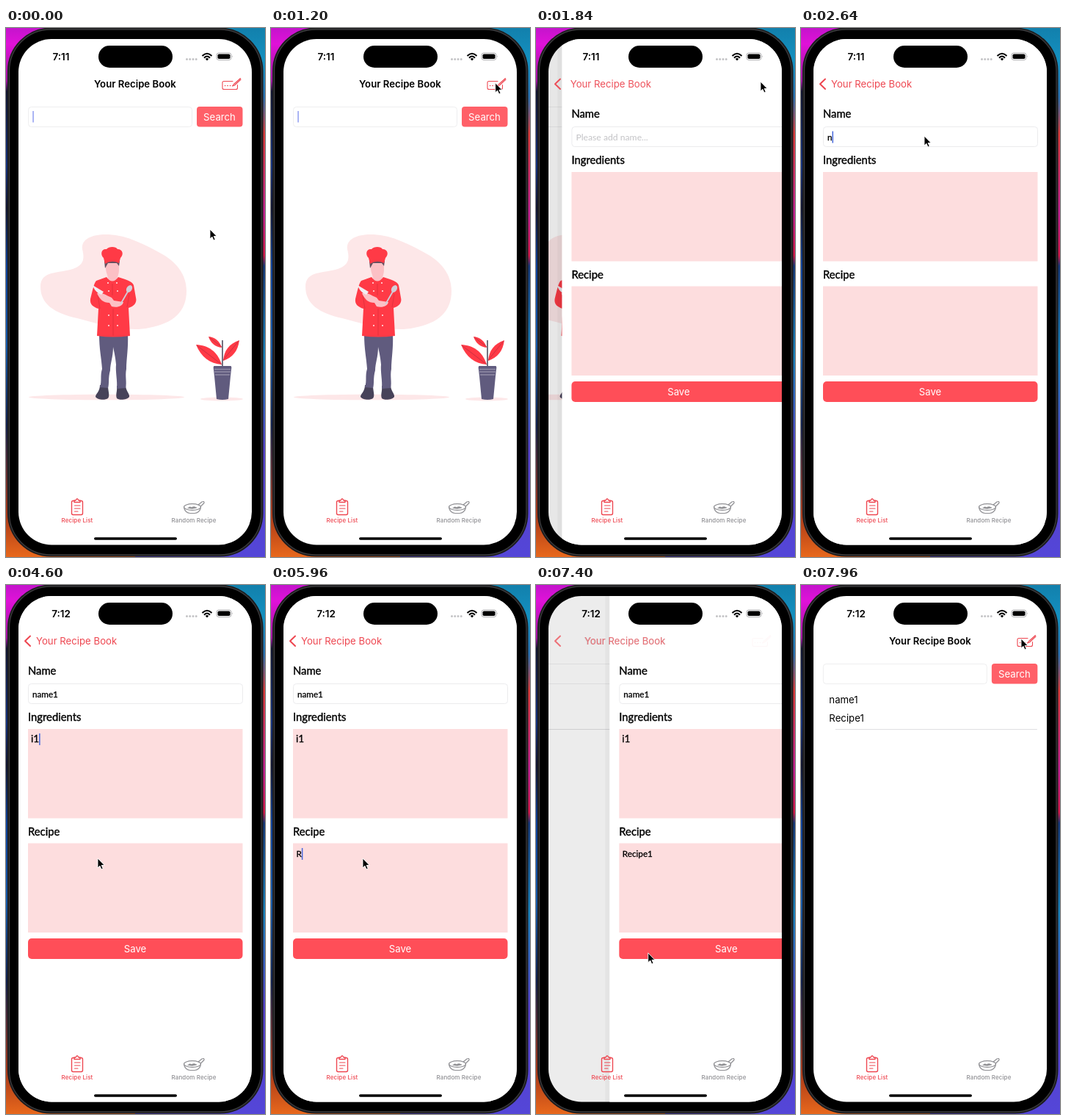
These frames come from a looping animation (353x720 px, 8 s). An HTML page:

```html
<!DOCTYPE html>
<html lang="en">
<head>
<meta charset="utf-8">
<title>Recipe book</title>
<style>
  html, body { margin: 0; width: 100%; height: 100%; overflow: hidden; background: #10142a; }
  svg { display: block; width: 100%; height: 100%; }
  text { font: 13.2px Inter, Roboto, sans-serif; white-space: pre; }
  .bold { font-weight: 600; }
  .tab { font-size: 8px; font-weight: 500; letter-spacing: .1px; }
  .label { font: 400 14.8px Lato, sans-serif; stroke: #000; stroke-width: .4; }
  .input { font: 400 11.700px Lato, sans-serif; stroke: #000; stroke-width: .3; }
  .hint { font: 12.2px Lato, sans-serif; fill: #c3c3c6; }
  .mid { text-anchor: middle; }
  .line { fill: none; stroke: currentColor; stroke-linecap: round; stroke-linejoin: round; }
  .red { color: #ee4751; }
  .grey { color: #8f8f93; }
</style>
</head>
<body>
<svg viewBox="0 0 353 720" preserveAspectRatio="none">
  <defs>
    <clipPath id="screen"><rect x="17" y="15" width="318" height="688.500" rx="45"/></clipPath>
    <linearGradient id="wallLeft" x2="0" y2="1">
      <stop offset="0" stop-color="#c414cc"/><stop offset=".03" stop-color="#e012d8"/>
      <stop offset=".1" stop-color="#a012a0"/><stop offset=".12" stop-color="#10142e"/>
      <stop offset=".26" stop-color="#12307c"/><stop offset=".34" stop-color="#10142e"/>
      <stop offset=".45" stop-color="#0c3f98"/><stop offset=".6" stop-color="#1458a8"/>
      <stop offset=".75" stop-color="#10204c"/><stop offset=".92" stop-color="#a83818"/>
      <stop offset="1" stop-color="#e8681c"/>
    </linearGradient>
    <linearGradient id="wallRight" x2="0" y2="1">
      <stop offset="0" stop-color="#1280ac"/><stop offset=".06" stop-color="#1490c0"/>
      <stop offset=".13" stop-color="#2870b0"/><stop offset=".2" stop-color="#d83a38"/>
      <stop offset=".35" stop-color="#c02090"/><stop offset=".43" stop-color="#d01848"/>
      <stop offset=".45" stop-color="#143878"/><stop offset=".62" stop-color="#1880b8"/>
      <stop offset=".8" stop-color="#5440c8"/><stop offset="1" stop-color="#5446d8"/>
    </linearGradient>
  </defs>

  <rect width="177" height="720" fill="url(#wallLeft)"/>
  <rect x="176" width="177" height="720" fill="url(#wallRight)"/>
  <rect x="3" y="0.5" width="346.500" height="718" rx="58" fill="#000" stroke="#1c1c1e" stroke-width="2"/>
  <rect x="4.500" y="2" width="343.500" height="715" rx="56.500" fill="none" stroke="#3c3c3e" stroke-width="1.300"/>

  <g clip-path="url(#screen)">
    <rect x="17" y="15" width="318" height="689" fill="#fff"/>

    <g id="home">
      <rect x="30.500" y="107.500" width="223" height="27" rx="4" fill="#fff" stroke="#eeeeef"/>
      <rect x="260" y="107" width="62.500" height="27.500" rx="4" fill="#ff6068"/>
      <text class="mid" x="291" y="125.500" fill="#fff">Search</text>
      <rect id="searchCaret" x="36.300" y="113" width="1.500" height="15.500" fill="#6275ec"/>

      <g id="emptyArt">
        <path fill="#fde7e8" d="M47 352C47 330 72 334 91 328C109 322 106 310 104 301C102 286 120 280 140 281C165 282 190 295 215 309C235 321 246 338 246 358C246 386 228 402 195 408C165 415 124 402 97 395C66 388 47 376 47 352Z"/>
        <ellipse cx="137" cy="502.500" rx="106" ry="3.800" fill="#fde7e8"/>
        <ellipse cx="294" cy="505" rx="29" ry="2.500" fill="#fde7e8"/>
        <!-- chef -->
        <g fill="#474259">
          <path d="M128 486L139 487C139 494 142 500 139 504C135 507 124 506 122 502C122 498 128 495 128 486Z"/>
          <path d="M151 487L163 486C163 494 169 498 168 502C166 506 154 507 151 504C149 499 152 494 151 487Z"/>
        </g>
        <path fill="#605b7e" d="M127 416H166C167 436 164 450 164 464C162 474 165 482 163 490L151 491C152 480 149 468 150 458C149 446 147 440 146 434C146 448 142 456 142 466C139 476 141 484 139 490L128 489C131 480 128 474 131 464C130 448 127 438 127 416Z"/>
        <path fill="#fcc0c5" d="M136 319H154V329C154 335 152 338 151 343L145 348L139 342C139 336 136 333 136 327Z"/>
        <path fill="#66505f" d="M134 317H155L154 324L151 320L139 320L135 327Z"/>
        <path fill="#ff3a46" d="M135 321L133 313C128 308 130 300 137 301C140 297 150 297 152 301C159 301 161 308 156 313L154 320Q144 315 135 321Z"/>
        <path fill="#ff3a46" d="M137 339L123 344C120 347 118 357 115 369C114 376 119 380 126 382L124 419Q146 422 169 419L167 381C174 379 179 374 177 367L174 350C172 345 166 343 153 339Q145 350 137 339Z"/>
        <path fill="none" stroke="#d92e3b" stroke-width=".7" d="M125 363L128 382M168 362L165 380M145 348V364M146 382V419"/>
        <path fill="#fcc0c5" d="M124 361C130 359 135 363 144 367L147 371L160 373C159 379 151 381 144 379L141 374C133 374 128 370 124 361Z"/>
        <path fill="#f1eef3" d="M118 350L133 359L130 363C124 361 120 356 118 350Z"/>
        <path fill="none" stroke="#d0ced8" stroke-width="1.800" d="M156 376L167 357"/>
        <ellipse cx="168" cy="355" rx="3.600" ry="5.300" fill="#d0ced8" transform="rotate(32 168 355)"/>
        <path fill="none" stroke="#fff" stroke-width="1.800" stroke-linecap="round" d="M139 347h0M151 347h0M140 358h0M152 358h0M140 391h0M152 391h0M140 405h0M152 405h0"/>
        <!-- plant -->
        <g fill="#ff3a46">
          <path d="M259 431C276 432 288 440 294 458C278 457 266 448 259 431Z"/>
          <path d="M318 425C316 440 309 448 296 453C297 439 304 430 318 425Z"/>
          <path d="M276 420C285 421 291 426 294 435C285 434 279 429 276 420Z"/>
        </g>
        <path fill="none" stroke="#b42c40" stroke-width=".7" d="M260 432L294 458M317 426L296 452M277 421L294 434"/>
        <path fill="none" stroke="#454356" stroke-width="1.500" d="M295 425V461"/>
        <path fill="#605b7e" d="M284 460H306Q308 460 307 465L306 474L303 505Q295 507 287 505L284 474L283 465Q282 460 284 460Z"/>
        <path fill="none" stroke="#918da7" stroke-width="1.400" d="M284 464.500H306M284 468H306M285 472H305"/>
      </g>

      <g id="savedList">
        <text x="38.500" y="161">name1</text>
        <text x="38.500" y="186">Recipe1</text>
        <path stroke="#dfdfe1" d="M47 196.500H322"/>
      </g>
    </g>
    <rect id="dim" x="17" y="15" width="318" height="689"/>

    <g id="form">
      <rect id="edge" x="11" y="15" width="6" height="689"/>
      <rect x="17" y="15" width="318" height="689" fill="#fff"/>
      <text class="label" x="30" y="122">Name</text>
      <text class="label" x="30" y="185">Ingredients</text>
      <text class="label" x="30" y="341">Recipe</text>
      <rect x="30.500" y="134.500" width="292" height="27" rx="4" fill="#fff" stroke="#ebebed"/>
      <rect x="30" y="196" width="292.500" height="121.500" fill="#fdddde"/>
      <rect x="30" y="351.500" width="292.500" height="121.500" fill="#fdddde"/>
      <text id="hint" class="hint" x="36" y="153">Please add name...</text>
      <text id="name" class="input" x="36" y="153"></text>
      <text id="ingredients" class="input" style="font-size:13.500px" x="34" y="214"></text>
      <text id="recipe" class="input" x="34.500" y="370"></text>
      <rect id="caret" width="1.500" height="16" fill="#4668dc"/>
      <g id="save">
        <rect x="30" y="481" width="292.500" height="28" rx="5" fill="#ff4e58"/>
        <text class="mid" x="176" y="500" fill="#fff">Save</text>
      </g>
    </g>

    <text id="title" class="bold" y="81">Your Recipe Book</text>
    <g class="red">
      <text id="back" y="81" fill="currentColor">Your Recipe Book</text>
      <path id="chevron" class="line" stroke-width="2" d="M33 69.500L26 76.200L33 83"/>
      <g id="compose" class="line" stroke-width="1.100">
        <path d="M309 72.500H297Q295 72.500 295 74.500V81.500Q295 83.500 297 83.500H313.500Q315.500 83.500 315.500 81.500V77.500"/>
        <path d="M319.500 68.500L310.500 76.500L308.500 79L311.500 78L320 70"/>
        <path d="M298.500 78.500h.2M302 78.500h.2M305.500 78.500h.2" stroke-width="1.600"/>
      </g>
      <g class="line" stroke-width="1.400">
        <path d="M93 643.500H91.500Q89.500 643.500 89.500 645.500V660.500Q89.500 662.500 91.500 662.500H102.500Q104.500 662.500 104.500 660.500V645.500Q104.500 643.500 102.500 643.500H101"/>
        <path d="M93 645.500V643H95Q97 638.500 99 643H101V645.500Z"/>
        <path d="M93.500 650H101M93.500 654H101M93.500 658H98" stroke-width="1.200"/>
      </g>
      <text class="tab mid" x="97" y="673" fill="currentColor">Recipe List</text>
    </g>
    <g class="grey">
      <g class="line" stroke-width="1.200">
        <ellipse cx="254" cy="652" rx="11.500" ry="4.300"/>
        <path d="M242.500 652.500C243 657 247 660.500 251 660.500H257C261 660.500 265 657 265.500 652.500"/>
        <path d="M262 649L267 645Q270.500 643.500 270 646.500L265.500 651"/>
        <path d="M248 653.500Q250 650.500 253 652.500Q256 650.500 260 653Q254 655 248 653.500Z" fill="currentColor" stroke-width=".6"/>
      </g>
      <text class="tab mid" x="256" y="673" fill="currentColor">Random Recipe</text>
    </g>

    <text id="clock" class="bold mid" style="font-size:13.500px" x="75" y="43.500"></text>
    <path d="M246.500 42.500h0M250.700 42.500h0M255 42.500h0M259.200 42.500h0" stroke="#c4c4c6" stroke-width="3" stroke-linecap="round"/>
    <g fill="none" stroke="#000" stroke-width="2">
      <path d="M267.500 38Q274 31.500 280.500 38M270 40.700Q274 36.500 278 40.700"/>
    </g>
    <path d="M271.800 42Q274 40.200 276.200 42L274 44.500Z"/>
    <rect x="287" y="34" width="20" height="9.500" rx="3" fill="none" stroke="#a5a5a7" stroke-width=".9"/>
    <rect x="288.500" y="35.500" width="17" height="6.500" rx="1.800"/>
    <path d="M308.300 37.500Q309.800 38.700 308.300 40Z" fill="#a5a5a7"/>
    <rect x="126" y="24" width="101" height="30" rx="15"/>
    <rect x="120" y="693.200" width="113" height="3.600" rx="1.800"/>
  </g>

  <path id="pointer" d="M0 0V13L3 10.300L5 15L7.200 14L5.200 9.500H9.200Z" stroke="#fff" stroke-width=".9" stroke-linejoin="round"/>
</svg>

<script>
const LOOP = 8000;
const PUSH = 1515, POP = 7330, PRESS = 7160;
const el = Object.fromEntries([...document.querySelectorAll('[id]')].map(e => [e.id, e]));

// Each field: focus time, caret top, text and the time each key lands.
const fields = [
  { node: el.name, focus: 2300, top: 140.5, text: 'name1', keys: [2560, 2780, 2940, 3100, 3380] },
  { node: el.ingredients, focus: 3800, top: 202, text: 'i1', keys: [4080, 4360] },
  { node: el.recipe, focus: 4720, top: 358, text: 'Recipe1', keys: [5880, 6060, 6180, 6300, 6420, 6540, 6760] }
];

// Pointer moves: start time, end time, destination.
const start = [278, 274];
const moves = [
  [540, 1240, 306, 73], [1840, 2260, 168, 147], [3440, 3760, 150, 250],
  [4240, 4560, 125, 372], [6800, 7130, 152, 503], [7380, 7880, 300, 73]
];

const clamp = v => Math.min(1, Math.max(0, v));
const ease = v => v * v * (3 - 2 * v);
const spring = ms => {
  const s = Math.max(0, ms) * .014;
  return 1 - (1 + s) * Math.exp(-s);
};
const blink = ms => {
  const phase = ms % 1000;
  return phase < 500 ? 1 : phase < 600 ? 1 - (phase - 500) / 100 : phase < 900 ? 0 : (phase - 900) / 100;
};
const shift = (node, x, y = 0) => node.setAttribute('transform', `translate(${x} ${y})`);
const fade = (node, v) => node.setAttribute('opacity', v);

function drawPointer(t) {
  let [x, y] = start;
  for (const [from, to, endX, endY] of moves) {
    const k = ease(clamp((t - from) / (to - from)));
    x += (endX - x) * k;
    y += (endY - y) * k;
  }
  shift(el.pointer, x, y);
}

function drawFields(t) {
  let active = null;
  for (const field of fields) {
    const typed = field.keys.filter(k => k <= t);
    field.node.textContent = field.text.slice(0, typed.length);
    if (t >= field.focus) active = { field, last: typed.at(-1) ?? field.focus };
  }
  fade(el.hint, fields[0].node.textContent ? 0 : 1);
  fade(el.caret, active && t < PRESS ? blink(t - active.last) : 0);
  if (active) {
    const { node, top } = active.field;
    const width = node.textContent ? node.getComputedTextLength() : 0;
    shift(el.caret, +node.getAttribute('x') + width, top);
  }
}

function drawNavigation(t) {
  const p = t < POP ? spring(t - PUSH) : 1 - spring(t - POP);
  const titleX = 120 - 79 * p ** 1.2;
  shift(el.home, -95 * p);
  shift(el.form, 318 * (1 - p));
  fade(el.dim, .1 * p);
  fade(el.edge, p > .01 && p < .99 ? .035 : 0);
  fade(el.title, (1 - p) ** 1.6);
  el.title.setAttribute('x', titleX);
  fade(el.back, p);
  el.back.setAttribute('x', titleX + 4 * (1 - p));
  fade(el.chevron, p);
  fade(el.compose, (1 - p) ** 2.5);
}

function draw(t) {
  drawNavigation(t);
  drawFields(t);
  drawPointer(t);
  const saved = t >= POP;
  fade(el.emptyArt, saved ? 0 : 1);
  fade(el.savedList, saved ? 1 : 0);
  fade(el.searchCaret, t < 1450 ? .7 * blink(t + 20) : 0);
  fade(el.save, t >= PRESS && t < POP ? .73 : 1);
  el.clock.textContent = t < 3600 ? '7:11' : '7:12';
}

function frame() {
  draw(performance.now() % LOOP);
  requestAnimationFrame(frame);
}
frame();
</script>
</body>
</html>
```
